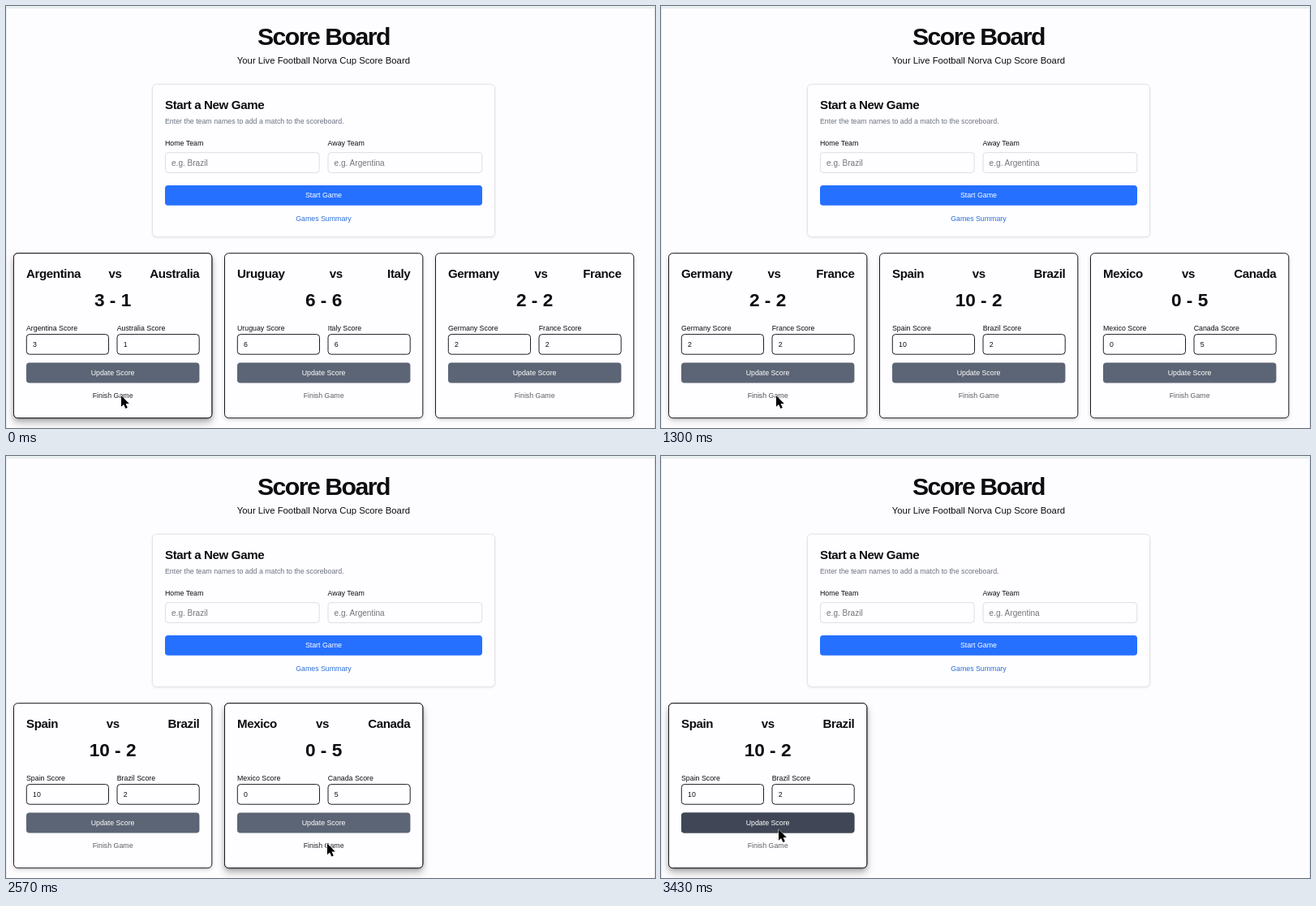
Animation, 800 px wide and 520 px high, one loop 3.46 s. Source, as an HTML page:

```html
<!DOCTYPE html>
<html lang="en">
<head>
<meta charset="utf-8">
<title>Score Board</title>
<style>
  html, body { margin: 0; width: 100%; height: 100%; overflow: hidden; background: #fdfcfe; }
  svg { display: block; width: 800px; height: 520px; font-family: "Liberation Sans", Arial, sans-serif; fill: #0c0d11; }
  .title { font-size: 30.2px; font-weight: 700; letter-spacing: -1.51px; }
  .lead { font-size: 11.3px; }
  .head { font-size: 15.09px; font-weight: 700; letter-spacing: -.377px; }
  .score { font-size: 22.6px; font-weight: 700; }
  .small { font-size: 8.8px; }
  .muted { fill: #6b7280; }
  .hint { font-size: 10.06px; fill: #757579; }
  .light { fill: #fff; }
  .link { fill: #2a6fd6; }
  .mid { text-anchor: middle; }
  .end { text-anchor: end; }
  .panel { fill: #fefdff; stroke: #e2e3e8; filter: drop-shadow(0 1px 1px rgba(0,0,0,.08)); }
  .field { fill: #fefdff; stroke: #dcdee4; }
  .card { fill: #fefdff; stroke: #17181c; }
  .dark { stroke: #1d1e23; }
  .rest { filter: drop-shadow(0 2px 2px rgba(0,0,0,.16)); }
  .lift { filter: drop-shadow(0 6px 5px rgba(0,0,0,.24)); }
  .primary { fill: #2570ff; }
  .slate { fill: #5c6575; }
  .slate-on { fill: #404655; }
</style>
</head>
<body>
<svg id="stage" viewBox="0 0 800 520">
  <rect width="800" height="520" fill="#fdfcfe"/>
  <rect width="800" height="2" fill="#e9f2f0"/>
  <rect y="2" width="800" height="1" fill="#e2e7e8"/>
  <path d="M.5 3V520M799.5 3V520" stroke="#ebebef"/>
  <g id="page"></g>
  <g id="cards"></g>
  <circle id="ring" r="20.8" fill="none" stroke="#111" stroke-width="1.3"/>
  <path id="cursor" d="M0 0V13.8L3.1 10.9L5.4 16L7.8 15L5.6 10.1H9.8Z" fill="#000" stroke="#fff" stroke-width="1" paint-order="stroke"/>
</svg>
<script>
const LOOP = 3460, STEP = 260, FADE = 150;
const $ = id => document.getElementById(id);

function add(parent, tag, attrs, label) {
  const el = document.createElementNS("http://www.w3.org/2000/svg", tag);
  for (const key in attrs) el.setAttribute(key, attrs[key]);
  if (label !== undefined) el.textContent = label;
  return parent.appendChild(el);
}
const text = (g, x, y, cls, label) => add(g, "text", { x, y, class: cls }, label);
const box = (g, x, y, width, height, cls, rx = 3.8) =>
  add(g, "rect", { x, y, width, height, rx, class: cls });

// Header and form
const page = $("page"), CX = 391.4;
text(page, CX, 48.3, "title mid", "Score Board");
text(page, CX, 70.6, "lead mid", "Your Live Football Norva Cup Score Board");
box(page, 180.5, 96.3, 422, 188, "panel", 5);
text(page, 196, 126.6, "head", "Start a New Game");
text(page, 196, 144.5, "small muted", "Enter the team names to add a match to the scoreboard.");
[[196, "Home Team", "e.g. Brazil"], [396.6, "Away Team", "e.g. Argentina"]].forEach(([x, label, hint]) => {
  text(page, x, 172.2, "small", label);
  box(page, x + .4, 180.6, 189.8, 24.8, "field");
  text(page, x + 8, 196.9, "hint", hint);
});
box(page, 196, 220.9, 391, 24.8, "primary");
text(page, CX, 236.3, "small light mid", "Start Game");
text(page, CX, 265.1, "small link mid", "Games Summary");

// gone: removal time; card, finish, update: hover spans
const games = [
  { teams: ["Argentina", "Australia"], goals: [3, 1], gone: 670, card: [[-999, 670]] },
  { teams: ["Uruguay", "Italy"], goals: [6, 6], gone: 1250, card: [[670, 1250]] },
  { teams: ["Germany", "France"], goals: [2, 2], gone: 1970, card: [[1250, 1970]] },
  { teams: ["Spain", "Brazil"], goals: [10, 2], gone: Infinity,
    card: [[1970, 2230], [3120, LOOP]], finish: [[1970, 2230], [3120, 3200]], update: [[3205, LOOP]] },
  { teams: ["Mexico", "Canada"], goals: [0, 5], gone: 3050, card: [[2240, 3050]] }
];

function buildCard(game) {
  const g = game.el = add($("cards"), "g", {});
  const [home, away] = game.teams;
  box(g, 9.5, 304.7, 244.3, 203, "card rest", 5);
  game.lift = box(g, 9.5, 304.7, 244.3, 203, "card lift", 5);
  const a = text(g, 25, 335.3, "head", home);
  const b = text(g, 238.4, 335.3, "head end", away);
  const vs = text(g, 0, 335.3, "head", "vs");
  const [wa, wb, wv] = [a, b, vs].map(el => el.getComputedTextLength());
  vs.setAttribute("x", 25 + wa + (213.4 - wa - wb - wv) / 2);
  text(g, 131.6, 369.9, "score mid", game.goals.join(" - "));
  game.teams.forEach((team, i) => {
    const x = 25 + i * 111.7;
    text(g, x, 400.4, "small", team + " Score");
    box(g, x + .3, 404.6, 101.2, 24.6, "field dark");
    text(g, x + 8, 419.9, "small", game.goals[i]);
  });
  box(g, 25, 439.6, 213.4, 24.9, "slate");
  game.dim = box(g, 25, 439.6, 213.4, 24.9, "slate-on");
  text(g, 131.6, 455.1, "small light mid", "Update Score");
  game.link = text(g, 131.6, 482.6, "small mid", "Finish Game");
}
games.forEach(buildCard);

const clamp = v => Math.max(0, Math.min(1, v));
const ease = v => v * v * (3 - 2 * v);
const hover = (spans = [], t) => spans.reduce((most, [on, off]) =>
  Math.max(most, ease(clamp((t - on) / FADE)) * (1 - ease(clamp((t - off) / FADE)))), 0);

// time, x, y
const track = [
  [0, 142, 480], [2140, 142, 480], [2200, 215, 476], [2300, 372, 470], [2360, 388, 473],
  [2480, 395, 477], [2670, 397, 478], [3050, 397, 478], [3090, 320, 480], [3150, 185, 474],
  [3200, 153, 467], [3300, 147, 462], [3430, 145, 460], [LOOP, 145, 460]
];
const presses = [[500, 630], [1110, 1210], [1730, 1880], [2910, 3000]];

function pointer(t) {
  const i = track.findIndex(p => p[0] > t);
  const [t0, x0, y0] = track[i - 1], [t1, x1, y1] = track[i];
  const k = (t - t0) / (t1 - t0);
  return [x0 + (x1 - x0) * k, y0 + (y1 - y0) * k];
}

function render(t) {
  let slot = 0;
  for (const game of games) {
    const shown = t < game.gone && slot < 3;
    game.el.setAttribute("visibility", shown ? "visible" : "hidden");
    if (!shown) continue;
    game.el.setAttribute("transform", `translate(${STEP * slot++})`);
    game.lift.setAttribute("opacity", hover(game.card, t));
    game.dim.setAttribute("opacity", hover(game.update, t));
    game.link.setAttribute("fill-opacity", .66 + .24 * hover(game.finish || game.card, t));
  }
  const [x, y] = pointer(t);
  $("cursor").setAttribute("transform", `translate(${x} ${y})`);
  $("ring").setAttribute("transform", `translate(${x - 1.7} ${y - .4})`);
  $("ring").setAttribute("visibility", presses.some(([on, off]) => t >= on && t < off) ? "visible" : "hidden");
}

const start = performance.now();
function tick() {
  render((performance.now() - start) % LOOP);
  requestAnimationFrame(tick);
}
tick();
</script>
</body>
</html>
```
